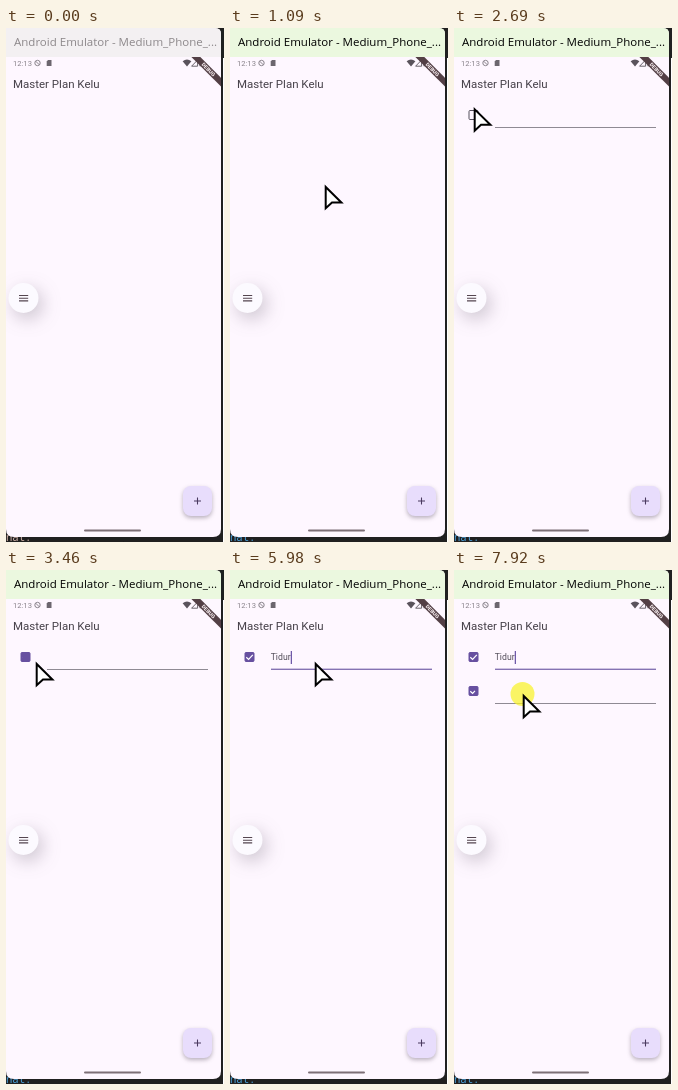
Write an HTML page that moves like this. It is 218 px wide and 514 px high and loops after 7.99 s.

```html
<!DOCTYPE html>
<html lang="en">
<head>
<meta charset="utf-8">
<title>To-do app demo</title>
<style>
  html, body { margin: 0; width: 100%; height: 100%; overflow: hidden; background: #202020; }
  svg { display: block; width: 218px; height: 514px; }
  text { font-family: Roboto, sans-serif; white-space: pre; }
  .bar { font: 11.5px "Open Sans", sans-serif; }
  .code { font: 10.6px "Noto Sans Mono", monospace; }
  .disc { filter: drop-shadow(4px 6px 9px rgba(60, 50, 70, .26)); }
  .fab { filter: drop-shadow(0 2px 2px rgba(60, 50, 70, .36)); }
</style>
</head>
<body>
<svg viewBox="0 0 218 514">
  <defs>
    <clipPath id="win"><path d="M0 0H209Q215 0 215 6V501Q215 509 207 509H8Q0 509 0 501Z"/></clipPath>
    <clipPath id="app"><path d="M0 29H215V509H0Z"/></clipPath>
  </defs>
  <rect width="218" height="514" fill="#202020"/>
  <rect x="217" y="30" width="1" height="484" fill="#fff"/>
  <text id="code" class="code" x="0" y="512.5">nat:</text>

  <g clip-path="url(#win)">
    <rect width="215" height="509" fill="#fef7ff"/>
    <rect id="bar" width="215" height="29"/>
    <text id="caption" class="bar" x="8" y="18">Android Emulator - Medium_Phone_...</text>

    <g fill="#8a848c">
      <text x="7" y="37.7" font-size="7.6">12:13</text>
      <circle cx="31.5" cy="35" r="2.7" fill="none" stroke="#8a848c"/>
      <path d="M29.7 33.2L33.3 36.8" stroke="#8a848c"/>
      <path d="M42 32H45.5V38H40.7V33.4Z" fill="#6c666e"/>
    </g>
    <g fill="#5a535c">
      <path d="M176.6 33.2Q181 29.8 185.4 33.2L181 38.4Z"/>
      <path d="M185.6 38.2L191.6 32V38.2Z" fill="none" stroke="#5a535c" stroke-width=".9"/>
      <rect x="193.5" y="32" width="3.6" height="6.3" rx=".6"/>
    </g>
    <text x="7" y="59.5" font-size="11.5" fill="#47414a">Master Plan Kelu</text>

    <g clip-path="url(#app)">
      <path d="M185.4 29H194.3L215 49.7V58.6Z" fill="#533f45"/>
      <text transform="translate(202.5 41.5) rotate(45)" y="1.9" font-size="5.3" font-weight="900" fill="#f3e9ec" text-anchor="middle">DEBUG</text>
    </g>

    <g id="row1">
      <rect id="line" x="41" width="161"/>
      <text id="word" x="40.7" y="90" font-size="8.7" fill="#55505c"></text>
      <rect id="caret" y="81" width="1.2" height="13" fill="#6750a4"/>
    </g>
    <g id="row2" transform="translate(0 34)">
      <rect x="41" y="99" width="161" height="1" fill="#8f8a94"/>
    </g>

    <circle class="disc" cx="17.5" cy="270" r="15" fill="#fcfaff"/>
    <path d="M13 267.5H22.2M13 270.2H22.2M13 272.9H22.2" stroke="#554650" stroke-width="1.1"/>
    <rect class="fab" x="177" y="458" width="29" height="30" rx="8" fill="#e8ddfc"/>
    <path d="M188 473H195M191.5 469.5V476.5" stroke="#4a3a60" stroke-width="1.1"/>
    <rect x="78" y="501.5" width="57" height="2" rx="1" fill="#7d6f76"/>
  </g>

  <g id="mouse">
    <circle id="halo" cx="-.5" r="12" fill="#f8f228" opacity=".72"/>
    <path d="M.7 2V23.3L7 17.5H16.4Z" fill="#fff" stroke="#000" stroke-width="2"/>
  </g>
</svg>
<script>
const LOOP = 7990;
const $ = id => document.getElementById(id);
const clamp = v => Math.max(0, Math.min(1, v));
const ease = k => k * k * (3 - 2 * k);
const show = (el, on) => el.setAttribute("visibility", on ? "inherit" : "hidden");
const set = (el, attrs) => { for (const k in attrs) el.setAttribute(k, attrs[k]); };

const fab = [188, 468], below = [118, 514];

// Pointer moves: start, end, target, sideways bend
const moves = [
  [110, 1090, [95, 157], -12],
  [1090, 1560, fab, 40],
  [1720, 2140, [18, 70], 13],
  [2140, 3040, [21, 84], 0],
  [3340, 3460, [30, 92], 0],
  [3600, 4090, [85, 92], 0],
  [5980, 6190, [220, 69], 0],
  [6450, 6451, below, 0],
  [6451, 6870, [144, 410], 0],
  [6870, 7080, fab, 0],
  [7150, 7640, [18, 121], 10],
  [7780, 7920, [69, 124], 0]
];

const click = { window: 800, add1: 1600, check1: 3290, field1: 3900, add2: 7080, check2: 7680, field2: 7890 };
const PRESS = 100;

function pointer(t) {
  let [x, y] = below;
  for (const [start, end, to, bend] of moves) {
    if (t < start) break;
    const k = ease(clamp((t - start) / (end - start)));
    const dx = to[0] - x, dy = to[1] - y;
    const side = bend * Math.sin(Math.PI * k) / Math.hypot(dx, dy);
    x += dx * k + dy * side;
    y += dy * k - dx * side;
  }
  return [x, y];
}

function addCheckbox(row) {
  row.insertAdjacentHTML("beforeend", `
    <rect class="fill" x="15" y="82.5" width="9" height="9" rx="1"/>
    <path class="tick" d="M16.3 87.2L18.6 89.4L22.8 84.8" fill="none" stroke="#fff"
      stroke-width="1.2" pathLength="1" stroke-dasharray="1 2"/>`);
}

// The box fills first, then the tick is drawn
function checkbox(row, t, start) {
  const k = clamp((t - start) / 200);
  set(row.querySelector(".fill"), {
    fill: k > 0 ? "#6750a0" : "none", stroke: k > 0 ? "#6750a0" : "#55505c"
  });
  const tick = row.querySelector(".tick");
  show(tick, k > .5);
  tick.setAttribute("stroke-dashoffset", 1 - clamp(k * 2 - 1));
}

const lettersAt = t => t < 5130 ? 0 : Math.max(1, Math.min(5, Math.floor((t - 5070) / 130)));

function caretOn(t) {
  if (t < 3960) return false;
  const since = t < 5130 ? t - 3960 : Math.max(0, t - 5690);
  return Math.floor(since / 500) % 2 === 0;
}

function draw(t) {
  const active = t >= click.window + 50;
  $("bar").setAttribute("fill", active ? "#ebf8df" : "#f3f0f2");
  $("caption").setAttribute("fill", active ? "#000" : "#8d888b");
  $("code").setAttribute("fill", active ? "#4a9fd8" : "#cdb0a6");

  show($("row1"), t >= click.add1 + 450);
  show($("row2"), t >= click.add2 + 140);
  checkbox($("row1"), t, click.check1 + 70);
  checkbox($("row2"), t, click.check2 + 70);

  const focused = t >= click.field1 + 180;
  set($("line"), focused
    ? { y: 98.6, height: 1.4, fill: "#8573b3" }
    : { y: 99, height: 1, fill: "#8f8a94" });

  const typed = "Tidur".slice(0, lettersAt(t));
  if ($("word").textContent !== typed) $("word").textContent = typed;
  $("caret").setAttribute("x", 40.8 + (typed ? $("word").getComputedTextLength() : 0));
  show($("caret"), caretOn(t));

  const [x, y] = pointer(t);
  $("mouse").setAttribute("transform", `translate(${x} ${y})`);
  show($("halo"), Object.values(click).some(c => t >= c && t < c + PRESS));
}

addCheckbox($("row1"));
addCheckbox($("row2"));
const began = performance.now();
function tick() {
  draw((performance.now() - began) % LOOP);
  requestAnimationFrame(tick);
}
tick();
</script>
</body>
</html>
```
